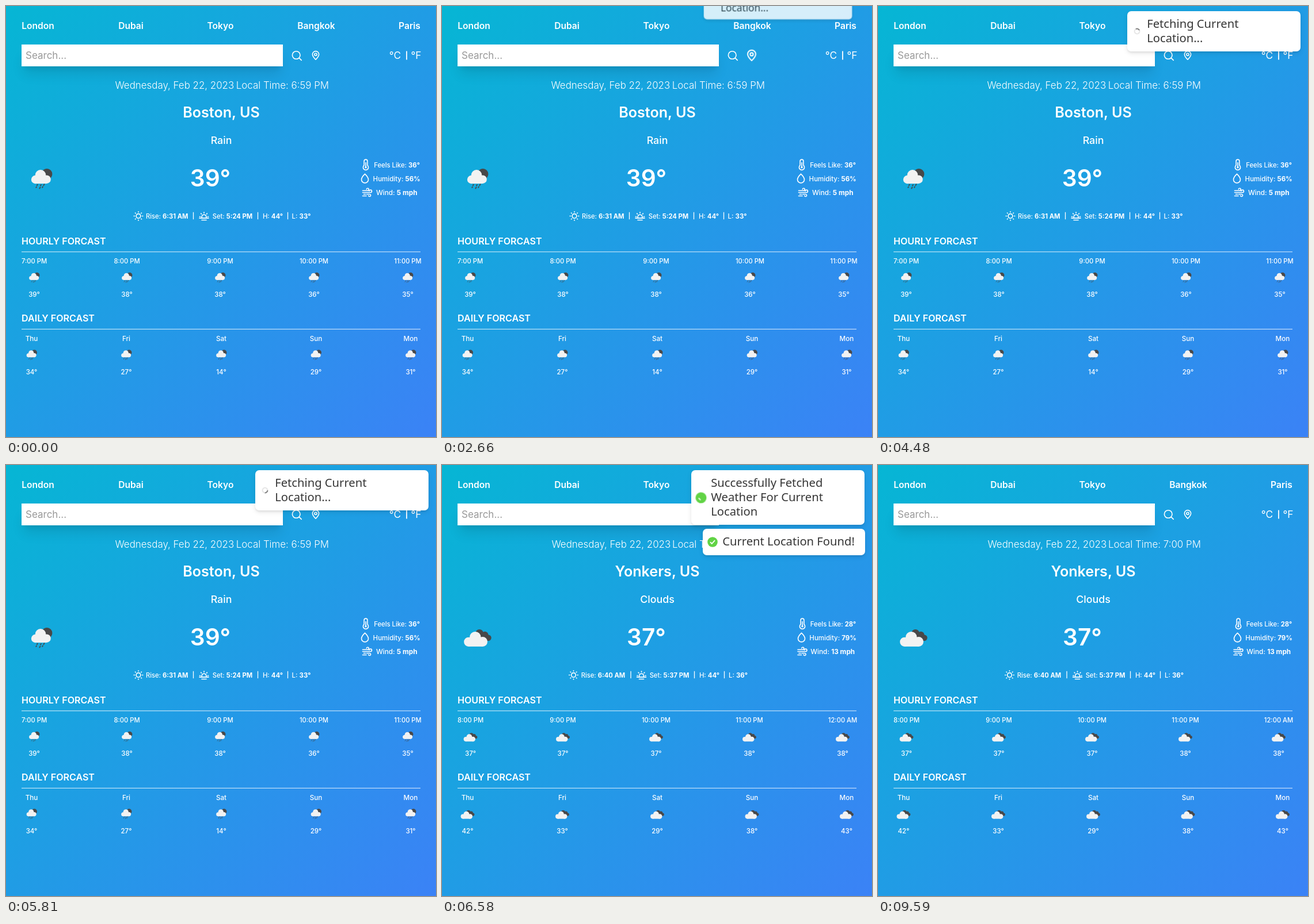
Write an HTML page that moves like this. It is 747x750 px and loops after 9730 ms.

```html
<!DOCTYPE html>
<html lang="en">
<head>
<meta charset="utf-8">
<title>Weather</title>
<style>
html, body { margin: 0; width: 100%; height: 100%; overflow: hidden; }
body { position: relative; background: linear-gradient(to bottom right, #06b6d4, #3b82f6); }
#page { position: absolute; left: 0; top: 0; font-family: Inter, "Open Sans", sans-serif; fill: #fff; }
#page .b { font-weight: 700; }
.line { fill: none; stroke: #fff; stroke-width: 1.6; stroke-linecap: round; stroke-linejoin: round; }
.pale { fill: #f2f2f2; }
.dark { fill: #484849; }
.drops { stroke: #484849; stroke-width: 1.8; stroke-linecap: round; }
#pin, .badge, .spin { transform-box: fill-box; transform-origin: center; }
#field {
  position: absolute; left: 27px; top: 67px; width: 454px; height: 37.5px; background: #fff;
  box-shadow: 0 17px 21px -4px rgba(0,0,0,.1), 0 7px 9px -5px rgba(0,0,0,.1);
}
.toast {
  position: absolute; background: #fff; color: #363636; border-radius: 7px; opacity: 0;
  box-shadow: 0 3px 9px rgba(0,0,0,.1), 0 3px 3px rgba(0,0,0,.05);
  font: 20.2px/25px "Noto Sans", "Open Sans", sans-serif;
}
.toast p { position: absolute; left: 34.2px; top: 9.2px; margin: 0; white-space: pre; }
.toast svg { position: absolute; left: 5.3px; top: calc(50% - 12px); overflow: visible; }
.tick { fill: none; stroke: #fff; stroke-width: 1.8; stroke-dasharray: 1 2; }
</style>
</head>
<body>
<div id="field"></div>
<svg id="page" width="747" height="750" viewBox="0 0 747 750"></svg>
<script>
const LOOP = 9730;
const HOVER_ON = 2220, HOVER_OFF = 3700;
const FETCH = 2577, FOUND = 5890, DONE = 6230;
const FOUND_OUT = 7890, DONE_OUT = 8405;
const ENTER = 'cubic-bezier(.21,1.02,.73,1)';
const EXIT = 'cubic-bezier(.06,.71,.55,1)';
const BACK = 'cubic-bezier(.175,.885,.32,1.275)';

const bold = s => `<tspan class="b">${s}</tspan>`;
const text = (x, y, size, s, weight = 500, anchor = 'middle', fill = '#fff') =>
  `<text x="${x}" y="${y}" font-size="${size}" font-weight="${weight}" text-anchor="${anchor}" fill="${fill}">${s}</text>`;
const at = (x, y, body, scale = 1) => `<g transform="translate(${x} ${y}) scale(${scale})">${body}</g>`;
const line = d => `<path class="line" d="${d}"/>`;
const bar = (x, y, h, w) => `<rect x="${x - w / 2}" y="${y - h / 2}" width="${w}" height="${h}"/>`;
const disc = (x, y, r) => `<circle cx="${x}" cy="${y}" r="${r}"/>`;
const heading = (y, s) => text(27, y, 16.1, s, 600, 'start') +
  `<rect x="27" y="${y + 12.8}" width="693" height="1" opacity=".85"/>`;

const rays = (from, to, a, b) => {
  let d = '';
  for (let i = a; i <= b; i++) {
    const c = Math.cos(i * Math.PI / 4), s = Math.sin(i * Math.PI / 4);
    d += `M${c * from} ${s * from}L${c * to} ${s * to}`;
  }
  return line(d);
};

const icon = {
  search: line('M6 0A6.8 6.8 0 1 1 -7.6 0A6.8 6.8 0 1 1 6 0M4.2 4.9L8.2 8.9'),
  pin: line('M0 7.2C-2 5 -5.6 2 -5.6 -1.8a5.6 5.6 0 0 1 11.2 0C5.6 2 2 5 0 7.2zM2.1 -1.7a2.1 2.1 0 1 1 -4.2 0a2.1 2.1 0 1 1 4.2 0'),
  thermo: line('M-2.9 1.2V-6a2.9 2.9 0 0 1 5.8 0V1.2a4.6 4.6 0 1 1 -5.8 0zM0 -3.5V4') + disc(0, 4.8, 1.7),
  drop: line('M0 -7.8C2.6 -5.2 6 -2 6 1.9a6 6 0 0 1 -12 0C-6 -2 -2.6 -5.2 0 -7.8z'),
  wind: line('M-8 -3.2H0.8a2 2 0 1 0 -2 -2.4M-8 0H5.8a2.2 2.2 0 1 0 -2.2 -2.6M-6 3H-3M-1 3H4.2a2 2 0 1 1 -2 2.6M-8 6H-1.5'),
  sun: line('M3.9 0a3.9 3.9 0 1 1 -7.8 0a3.9 3.9 0 1 1 7.8 0') + rays(6.7, 7.8, 0, 7),
  sunset: at(0, 1, line('M-3.8 1.8a4 4 0 1 1 7.6 0M-8 2.6H8M-4 6H4') + rays(6.3, 7.6, 4, 8)),
  rain: `<g class="dark">${disc(9.5, -8, 9.4)}</g>
    <g class="pale">${disc(-10.5, 1.5, 7.2)}${disc(-1.5, -6.3, 9.2)}${disc(9, 1.2, 7.3)}<rect x="-11" y="-3" width="20" height="11.6"/></g>
    <path class="drops" d="M-6.8 10.3l-1 1.6M-0.6 10.6l-1 1.6M5 9.8l-1.2 2M-8.5 14.4l-.8 1M-2 15l-1.2 2M2.4 14l-.8 1.4"/>`,
  clouds: `<g class="dark">${disc(3, -8, 7)}${disc(12.5, -5.2, 6)}${disc(18.5, -.2, 5.2)}<rect x="4" y="-6" width="14.5" height="11"/></g>
    <g class="pale">${disc(-15.8, 6.8, 8.1)}${disc(-4.2, -1.2, 9.8)}${disc(8.6, 6.5, 8.4)}<rect x="-16" y="2" width="25" height="12.9"/></g>`
};

const DAYS = ['Thu', 'Fri', 'Sat', 'Sun', 'Mon'];
const DAY_X = [44.5, 209, 374, 538.5, 703];

const scene = s => {
  const d = s.shift;
  let out = text(292.8 + d, 143.5, 16.9, 'Wednesday, Feb 22, 2023', 300) +
    text(480.4, 143.5, 16.9, `Local Time: ${s.time}`, 300) +
    text(374, 194, 25.1, s.city, 600) +
    text(374, 239.7, 17.8, s.sky) +
    text(355, 314, 40.6, s.temp + '°', 600) +
    at(s.big[0], s.big[1], icon[s.icon]) +
    at(625 + d, 276, icon.thermo) + at(623.5 + d, 300, icon.drop) + at(627.5 - d * 1.5, 324.5, icon.wind) +
    text(679 + d / 2, 280.5, 11.3, `Feels Like: ${bold(s.feels + '°')}`) +
    text(678.7 + d / 2, 304.5, 11.5, `Humidity: ${bold(s.humid + '%')}`) +
    text(678.7, 328.5, 11.8, `Wind: ${bold(s.wind + ' mph')}`);

  const [sun, rise, b1, dusk, set, b2, high, b3, low] = s.row;
  out += at(sun, 365.5, icon.sun) + at(dusk, 365.5, icon.sunset) +
    text(rise, 369.8, 11.2, `Rise: ${bold(s.rise)}`) +
    text(set, 369.8, 11.2, `Set: ${bold(s.set)}`) +
    text(high, 369.8, 11.4, `H: ${bold(s.high + '°')}`) +
    text(low, 369.8, 11.4, `L: ${bold(s.low + '°')}`) +
    [b1, b2, b3].map(x => bar(x, 365, 12.5, 1.3)).join('');

  s.hours.forEach(([label, temp], i) => {
    const x = s.hourX[i];
    out += text(x, 447.7, 11.2, label) + at(x, s.iconY, icon[s.icon], .5) + text(x, 506.2, 11.5, temp + '°');
  });
  s.days.forEach((temp, i) => {
    const x = DAY_X[i];
    out += text(x, 582.7, 11.7, DAYS[i]) + at(x, s.iconY + 134.5, icon[s.icon], .5) + text(x, 640.7, 11.5, temp + '°');
  });
  return `<g id="${s.id}">${out}</g>`;
};

const boston = {
  id: 'boston', city: 'Boston, US', sky: 'Rain', icon: 'rain', temp: 39, shift: 0, time: '6:59 PM',
  big: [61.5, 300.5], iconY: 472.5, feels: 36, humid: 56, wind: 5,
  rise: '6:31 AM', set: '5:24 PM', high: 44, low: 33,
  row: [230, 279.7, 325.5, 344, 393.5, 437.5, 463.5, 489.5, 513],
  hours: [['7:00 PM', 39], ['8:00 PM', 38], ['9:00 PM', 38], ['10:00 PM', 36], ['11:00 PM', 35]],
  hourX: [49, 210, 372, 535, 698], days: [34, 27, 14, 29, 31]
};
const yonkers = {
  id: 'yonkers', city: 'Yonkers, US', sky: 'Clouds', icon: 'clouds', temp: 37, shift: 1, time: '7:00 PM',
  big: [62, 301], iconY: 473.7, feels: 28, humid: 79, wind: 13,
  rise: '6:40 AM', set: '5:37 PM', high: 44, low: 36,
  row: [228.5, 280, 328, 346.5, 395, 438.5, 464.5, 490.5, 514.5],
  hours: [['8:00 PM', 37], ['9:00 PM', 37], ['10:00 PM', 37], ['11:00 PM', 38], ['12:00 AM', 38]],
  hourX: [49.5, 210, 372, 534, 696], days: [42, 33, 29, 38, 43]
};

const cities = [['London', 55.5], ['Dubai', 217], ['Tokyo', 372.5], ['Bangkok', 539], ['Paris', 701]];
const page = document.getElementById('page');
page.innerHTML = cities.map(([name, x]) => text(x, 39.5, 15.6, name, 600)).join('') +
  text(34, 92, 17, 'Search...', 400, 'start', '#999') +
  at(505, 85.5, icon.search) + at(538, 86, `<g id="pin">${icon.pin}</g>`) +
  text(676, 92, 17.3, '°C', 400) + bar(696, 86, 15, 1.8) + text(712.5, 92, 17.3, '°F', 400) +
  heading(414.5, 'HOURLY FORCAST') + heading(549, 'DAILY FORCAST') +
  scene(boston) + scene(yonkers);

const spinner = `<g class="spin"><circle r="4.4" fill="none" stroke="#e0e0e0" stroke-width="1.7"/>
  <path d="M3.1 -3.1A4.4 4.4 0 0 1 3.1 3.1" fill="none" stroke="#616161" stroke-width="1.7"/></g>`;
const badge = `<g class="badge"><circle r="8.8" fill="#61d345"/>
  <path class="tick" pathLength="1" d="M-4 .2L-1.2 3L4 -2.8"/></g>`;

const toast = (x, y, w, h, mark, msg) => {
  const el = document.createElement('div');
  el.className = 'toast';
  el.style.cssText = `left:${x}px;top:${y}px;width:${w}px;height:${h}px`;
  el.innerHTML = `<svg width="24" height="24" viewBox="-12 -12 24 24">${mark}</svg><p>${msg}</p>`;
  document.body.append(el);
  return el;
};
const fetching = toast(433.3, 8.6, 300.7, 70.4, spinner, 'Fetching Current\nLocation...');
const found = toast(452.5, 111, 281.5, 45.5, badge, 'Current Location Found!');
const done = toast(433.3, 8.6, 300.7, 95, badge, 'Successfully Fetched\nWeather For Current\nLocation');

// Steps are [time, style, easing to the next step].
const zero = document.timeline.currentTime;
const track = (el, steps) => {
  const first = steps[0], last = steps[steps.length - 1];
  const frames = [[0, first[1]], ...steps, [LOOP, last[1]]]
    .map(([t, style, easing = 'linear']) => ({ offset: t / LOOP, easing, ...style }));
  el.animate(frames, { duration: LOOP, iterations: Infinity }).startTime = zero;
};
const move = (transform, opacity = 1) => ({ transform, opacity });
const hidden = move('translateY(-200%) scale(.6)', 0);
const above = move('translateY(-200%) scale(.6)', .5);
const rest = move('translateY(0%) scale(1)');
const gone = move('translateY(-150%) scale(.6)', 0);
const show = { opacity: 1 }, hide = { opacity: 0 };

track(document.getElementById('boston'), [[DONE, show], [DONE, hide]]);
track(document.getElementById('yonkers'), [[DONE, hide], [DONE, show]]);

const small = { transform: 'scale(1)' }, large = { transform: 'scale(1.25)' };
track(document.getElementById('pin'), [
  [HOVER_ON, small, 'ease-out'], [HOVER_ON + 260, large],
  [HOVER_OFF, large, 'ease-out'], [HOVER_OFF + 260, small]
]);

track(fetching, [
  [FETCH, hidden], [FETCH, above, ENTER], [FETCH + 350, rest],
  [FOUND, rest], [FOUND, { ...rest, opacity: 0 }]
]);
const spin = t => [t, { transform: `rotate(${(t - 2680) * .36}deg)` }];
track(fetching.querySelector('.spin'), [spin(FETCH), spin(FOUND)]);

const top1 = 'translateY(-102.5px) scale(1)';
track(found, [
  [FOUND, move(top1, 0)], [FOUND, move(top1)], [DONE, move(top1), ENTER],
  [DONE + 230, rest], [FOUND_OUT, rest, EXIT], [FOUND_OUT + 400, gone]
]);
track(done, [
  [DONE, hidden], [DONE, above, ENTER], [DONE + 350, rest],
  [DONE_OUT, rest, EXIT], [DONE_OUT + 400, gone]
]);

for (const [el, t] of [[found, FOUND], [done, DONE + 70]]) {
  track(el.querySelector('.badge'), [
    [t + 100, move('scale(0) rotate(45deg)', 0), BACK],
    [t + 400, move('scale(1) rotate(0deg)')]
  ]);
  track(el.querySelector('.tick'), [
    [t + 200, { strokeDashoffset: 1, opacity: 0 }, 'ease-out'],
    [t + 280, { strokeDashoffset: .66, opacity: 1 }, 'ease-out'],
    [t + 400, { strokeDashoffset: 0, opacity: 1 }]
  ]);
}
</script>
</body>
</html>
```
